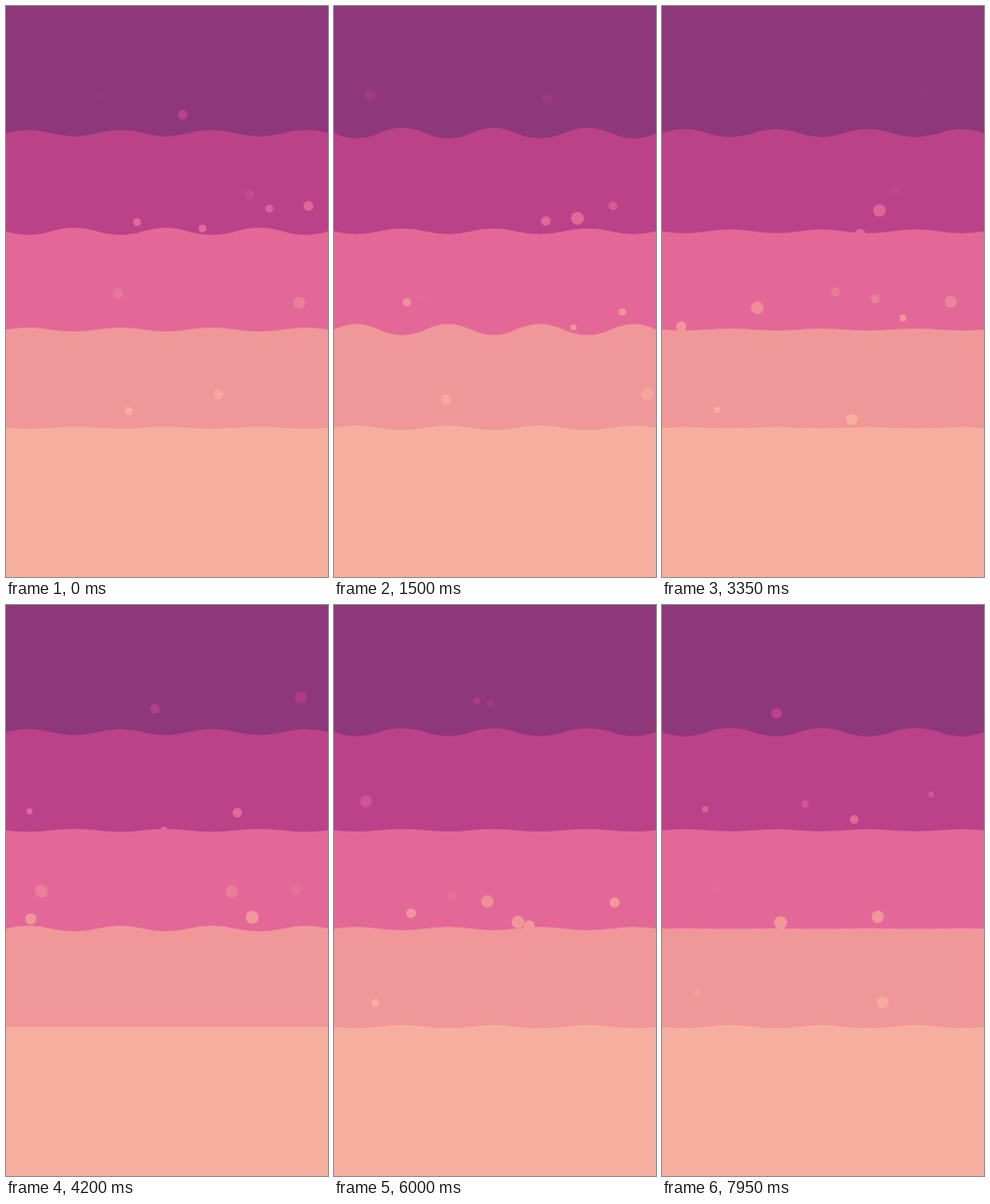
Recreate the animation shown at these times as an HTML page with a canvas. Size 338 by 600 pixels, loop 8 s.

```html
<!DOCTYPE html>
<html lang="en">
<head>
<meta charset="utf-8">
<title>Bubbling waves</title>
<style>
  html, body { margin: 0; width: 100%; height: 100%; overflow: hidden; background: #8e377a; }
  canvas { display: block; width: 338px; height: 600px; }
</style>
</head>
<body>
<canvas id="stage"></canvas>
<script>
const W = 338, H = 600, LOOP = 8000, STEP = 50;
const TOP = 133.6, SPACING = 103.2;   // first surface and distance to the next
const LIFE = 850, COUNT = 124;        // bubble lifetime and bubbles per loop
const DEPTH = 8;                      // bubbles are born this far below the surface
const FADE = 1.8;                     // fading starts when FADE * remaining life is below 1

const canvas = document.getElementById('stage');
const ctx = canvas.getContext('2d');
const dpr = window.devicePixelRatio || 1;
canvas.width = W * dpr;
canvas.height = H * dpr;
ctx.scale(dpr, dpr);

// Where every wave crosses its surface, and the key times of the swell.
const nodes = [0, 47, 96, 144, 191, 241, 291, W];
const keyTimes = [0, 1500, 2500, 4200, 6000, 6700, 7950];

// swell: height of the first crest at each key time; share: part of all bubbles
const layers = [
  { color: '#bb4189', share: 0.22, swell: [3.3, -5.7, 5.2, 3, -4.2, -3.8, -4.4] },
  { color: '#e36898', share: 0.34, swell: [-3.8, -3, -2.5, -1.5, -1.2, -1, 1] },
  { color: '#f0979a', share: 0.32, swell: [2, 5.8, -4.8, 3, 1.8, 3.7, 0.3] },
  { color: '#f6af9f', share: 0.12, swell: [-1, 2.2, 1.6, 0, -1.8, 0, -1.6] }
];
layers.forEach((layer, i) => { layer.base = TOP + SPACING * i; });

let seed = 7;
function random(min, max) {
  seed = (seed * 16807) % 2147483647;
  return min + (max - min) * seed / 2147483647;
}

function pickLayer() {
  let rest = random(0, 1);
  return layers.find(layer => (rest -= layer.share) < 0) || layers[1];
}

// Births are spread evenly, beginning one lifetime before the loop.
const gap = (LOOP + LIFE) / COUNT;
const bubbles = Array.from({ length: COUNT }, (_, i) => ({
  layer: pickLayer(),
  born: (i + random(0, 1)) * gap - LIFE,
  x: random(5, W - 5),
  r: random(3, 7),
  rise: random(38, 52),
  drift: random(-14, 14)
}));

const easeOut = p => 1 - (1 - p) * (1 - p);
const easeSine = p => (1 - Math.cos(Math.PI * p)) / 2;

function swellAt(swell, t) {
  const i = Math.max(1, keyTimes.findIndex(k => k >= t));
  const p = (t - keyTimes[i - 1]) / (keyTimes[i] - keyTimes[i - 1]);
  return swell[i - 1] + (swell[i] - swell[i - 1]) * easeSine(p);
}

function drawWave({ base, color, swell }, t) {
  let bend = 2 * swellAt(swell, t);
  ctx.fillStyle = color;
  ctx.beginPath();
  ctx.moveTo(0, base);
  for (let i = 1; i < nodes.length; i++) {
    ctx.quadraticCurveTo((nodes[i - 1] + nodes[i]) / 2, base - bend, nodes[i], base);
    bend = -bend;
  }
  ctx.lineTo(W, H);
  ctx.lineTo(0, H);
  ctx.fill();
}

function drawBubble({ layer, born, x, r, rise, drift }, t) {
  const p = (t - born) / LIFE;
  if (p < 0 || p >= 1) return;
  ctx.globalAlpha = Math.min(1, FADE * (1 - p));
  ctx.fillStyle = layer.color;
  ctx.beginPath();
  ctx.arc(x + drift * p, layer.base + DEPTH - rise * easeOut(p), r, 0, 2 * Math.PI);
  ctx.fill();
  ctx.globalAlpha = 1;
}

function draw(t) {
  ctx.fillStyle = '#8e377a';
  ctx.fillRect(0, 0, W, H);
  for (const layer of layers) {
    bubbles.filter(b => b.layer === layer).forEach(b => drawBubble(b, t));
    drawWave(layer, t);
  }
}

const start = performance.now();
function tick() {
  const t = (performance.now() - start) % LOOP;
  draw(Math.floor(t / STEP) * STEP);
  requestAnimationFrame(tick);
}
tick();
</script>
</body>
</html>
```
